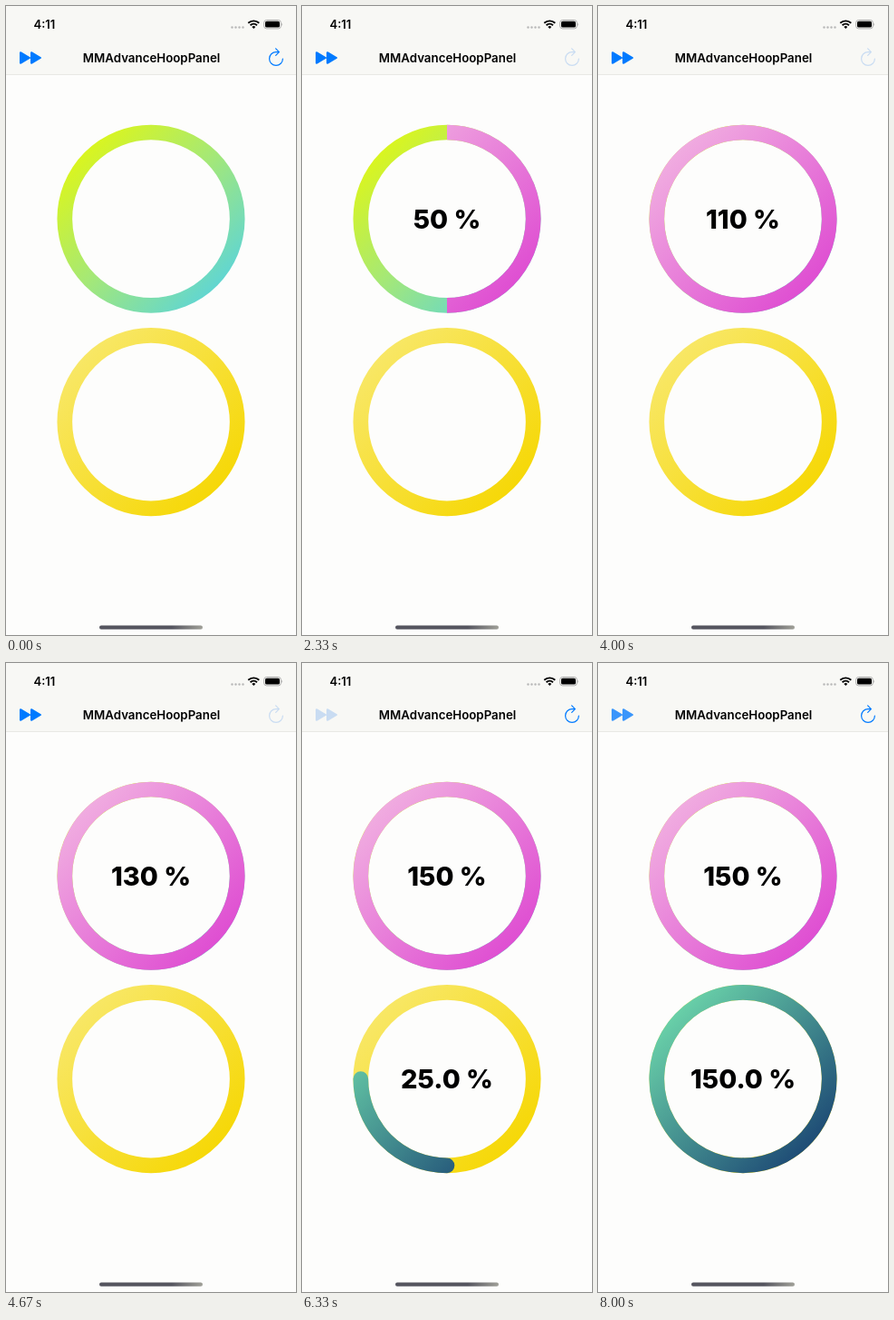
Animation, 320 px wide and 692 px high, one loop 8.33 s. Source, as an HTML page:

```html
<!DOCTYPE html>
<html lang="en">
<head>
<meta charset="utf-8">
<title>Progress rings</title>
<style>
  html, body { margin: 0; width: 100%; height: 100%; overflow: hidden; background: #fdfdfc; }
  svg { display: block; width: 100vw; height: 100vh; }
  text { font-family: Inter, "Liberation Sans", sans-serif; }
  .value { font-size: 29px; font-weight: 800; text-anchor: middle; }
  .ring { fill: none; stroke-width: 16.7; }
</style>
</head>
<body>
<svg viewBox="0 0 320 692">
  <defs>
    <linearGradient id="lime" gradientUnits="userSpaceOnUse" x1="-104" y1="-104" x2="104" y2="104">
      <stop offset=".15" stop-color="#d9f520"/><stop offset=".5" stop-color="#a4e878"/><stop offset=".85" stop-color="#62d6d0"/>
    </linearGradient>
    <linearGradient id="pink" href="#lime">
      <stop offset=".15" stop-color="#f0abe0"/><stop offset=".85" stop-color="#df4fd2"/>
    </linearGradient>
    <linearGradient id="gold" href="#lime">
      <stop offset=".15" stop-color="#f8e765"/><stop offset=".85" stop-color="#f6d808"/>
    </linearGradient>
    <linearGradient id="green" href="#lime">
      <stop offset=".15" stop-color="#68cfa8"/><stop offset=".85" stop-color="#1f4d76"/>
    </linearGradient>
    <linearGradient id="bar">
      <stop offset=".7" stop-color="#55555f"/><stop offset="1" stop-color="#a0a098"/>
    </linearGradient>
  </defs>

  <rect width="320" height="692" fill="#fdfdfc"/>
  <rect width="320" height="75.5" fill="#f8f8f5"/>
  <rect y="75" width="320" height=".6" fill="#dcdcd8"/>

  <text x="30.5" y="25" font-size="13" font-weight="600">4:11</text>
  <g fill="#b9b9b9">
    <circle cx="249.5" cy="23.5" r="1.2"/><circle cx="253.5" cy="23.5" r="1.2"/>
    <circle cx="257.5" cy="23.5" r="1.2"/><circle cx="261.5" cy="23.5" r="1.2"/>
  </g>
  <g fill="none" stroke="#000" stroke-width="1.9">
    <path d="M267.3 18.8a8.6 8.6 0 0 1 12 0M269.6 21.3a5.3 5.3 0 0 1 7.4 0"/>
    <path d="M273.3 25l-2-2.1a2.9 2.9 0 0 1 4 0z" fill="#000" stroke="none"/>
  </g>
  <rect x="284.7" y="15.5" width="18.6" height="9.4" rx="2.8" fill="none" stroke="#a5a5a5" stroke-width=".9"/>
  <rect x="286" y="16.8" width="16" height="6.8" rx="1.6"/>
  <path d="M304.4 18.4q1.6 1.8 0 3.6z" fill="#a5a5a5"/>

  <path id="forward" d="M16 51.2v11.6l10-5.8zM28 51.2v11.6l10-5.8z" stroke-width="2" stroke-linejoin="round"/>
  <text x="160.5" y="62" font-size="13.3" font-weight="600" text-anchor="middle">MMAdvanceHoopPanel</text>
  <path id="reload" d="M305.4 58a7.4 7.4 0 1 1-7.4-7.4h3M297.7 46.8l3.7 3.8-3.7 3.8" fill="none" stroke-width="1.2" stroke-linecap="round" stroke-linejoin="round"/>

  <g transform="translate(160 234.2)">
    <circle class="ring" r="95.2" stroke="url(#lime)"/>
    <path id="arc1" class="ring" stroke="url(#pink)"/>
    <text id="value1" class="value" y="10.8"/>
  </g>
  <g transform="translate(160 457.6)">
    <circle class="ring" r="95.2" stroke="url(#gold)"/>
    <path id="arc2" class="ring" stroke="url(#green)" stroke-linecap="round"/>
    <text id="value2" class="value" y="10.8"/>
  </g>

  <rect x="103" y="681.6" width="114" height="4.2" rx="2.1" fill="url(#bar)"/>
</svg>
<script>
const LOOP = 8330, TICK = 1000 / 3, RADIUS = 95.2;
const $ = id => document.getElementById(id);

// Clockwise arc; startY is -RADIUS for the top or RADIUS for the bottom.
function arcPath(percent, startY) {
  if (percent <= 0) return '';
  const angle = Math.min(percent, 99.999) / 50 * Math.PI;
  const x = -startY * Math.sin(angle), y = startY * Math.cos(angle);
  return `M0 ${startY}A${RADIUS} ${RADIUS} 0 ${percent > 50 ? 1 : 0} 1 ${x} ${y}`;
}

function setRing(n, percent, startY, label) {
  $('arc' + n).setAttribute('d', arcPath(percent, startY));
  $('value' + n).textContent = label;
}

// A button greys out while its ring runs and fades back on the last tick.
function setButton(id, tick, start, end) {
  const color = tick >= start && tick < end ? '#c9dcf2' : tick === end ? '#3a96fb' : '#007aff';
  $(id).style.stroke = color;
  if (id === 'forward') $(id).style.fill = color;
}

// The first ring counts in tens, quickly at first and then one step per tick.
function firstPercent(tick) {
  if (tick > 9) return Math.min(150, 10 * (tick - 1));
  return Math.max(0, Math.round((10 + 17.5 * (tick - 5)) / 10) * 10);
}

function draw(now) {
  const tick = Math.floor((now % LOOP + 5) / TICK) % 25;
  const first = firstPercent(tick);
  const second = Math.max(0, 25 * (tick - 18));
  setRing(1, first, -RADIUS, tick < 4 ? '' : `${first} %`);
  setRing(2, second, RADIUS, tick < 17 ? '' : `${second.toFixed(1)} %`);
  setButton('reload', tick, 5, 16);
  setButton('forward', tick, 18, 24);
}

const began = performance.now();
function loop() {
  draw(performance.now() - began);
  requestAnimationFrame(loop);
}
loop();
</script>
</body>
</html>
```
